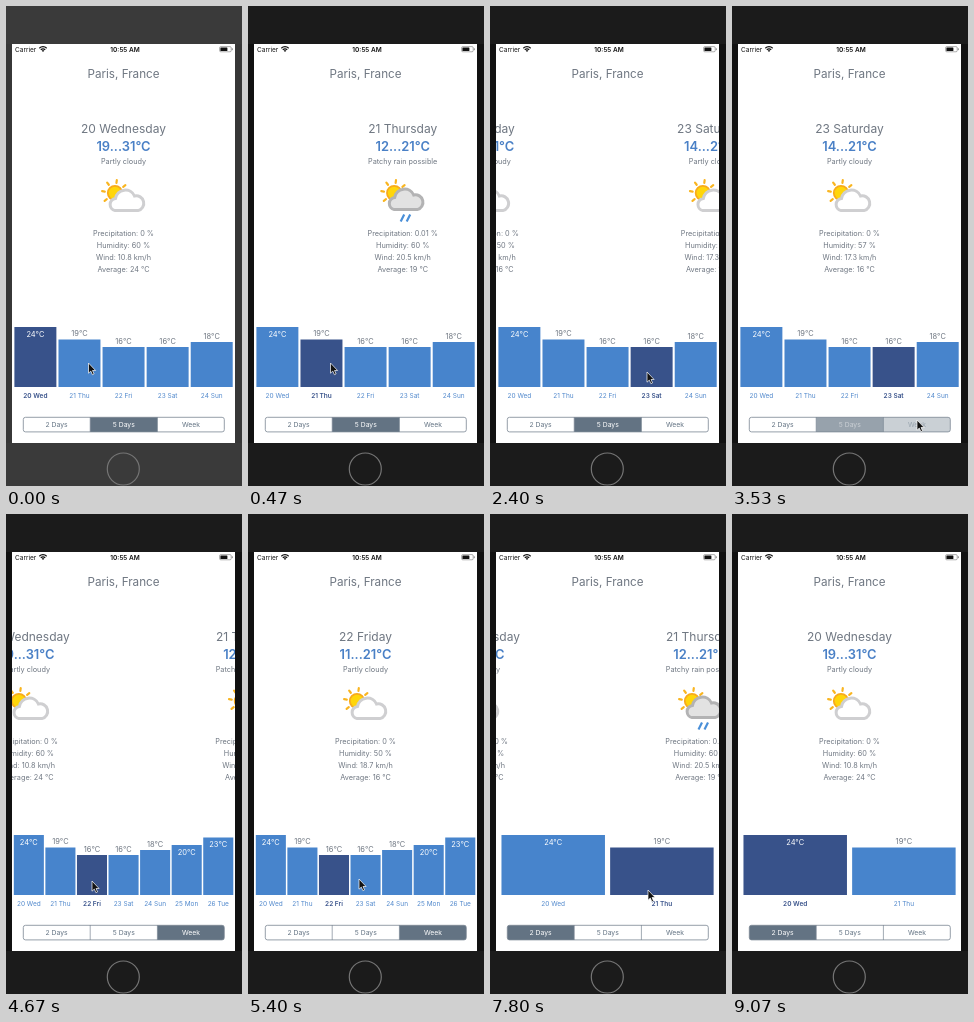
Animation of 236x480 px, one loop 9.99 s. Source, as an HTML page:

```html
<!DOCTYPE html>
<html lang="en">
<head>
<meta charset="utf-8">
<title>Weather</title>
<style>
  html, body { margin: 0; width: 100%; height: 100%; overflow: hidden; background: #1b1b1b; }
  svg { display: block; width: 236px; height: 480px; }
  text { font-family: Inter, "Liberation Sans", sans-serif; text-anchor: middle; fill: #6f7782; }
  .left { text-anchor: start; }
</style>
</head>
<body>
<svg id="stage" viewBox="0 0 236 480" xmlns="http://www.w3.org/2000/svg">
  <defs>
    <clipPath id="screen"><rect x="6" y="38" width="223" height="399"/></clipPath>
    <clipPath id="pill"><rect x="17.3" y="411.3" width="201" height="14.6" rx="2.2"/></clipPath>
  </defs>
  <rect id="body" width="236" height="480"/>
  <rect id="sides" y="38" width="236" height="399"/>
  <rect x="6" y="38" width="223" height="399" fill="#fff"/>
  <circle cx="117.3" cy="463" r="16" fill="none" stroke="#757575" stroke-width="1.2"/>

  <text class="left" x="9" y="45.6" font-size="6.5" style="fill:#111">Carrier</text>
  <g fill="none" stroke="#111" stroke-width="1.2">
    <path d="M33.3 42.2a5.3 5.3 0 0 1 7.4 0M34.8 43.8a3.1 3.1 0 0 1 4.4 0"/>
    <path d="M37 46l-1.2-1.3a1.7 1.7 0 0 1 2.4 0z" fill="#111" stroke="none"/>
  </g>
  <text x="119" y="45.6" font-size="6.5" font-weight="600" style="fill:#111">10:55 AM</text>
  <rect x="213.6" y="40.6" width="11.6" height="5.2" rx="1.2" fill="none" stroke="#777" stroke-width=".6"/>
  <rect x="214.4" y="41.4" width="7" height="3.6" rx=".5" fill="#111"/>
  <rect x="225.8" y="42.2" width=".9" height="2" rx=".4" fill="#777"/>

  <text x="117.5" y="71.8" font-size="11.7">Paris, France</text>
  <g clip-path="url(#screen)"><g id="pages"></g></g>
  <g id="charts"></g>
  <g id="tabs"></g>
  <path id="cursor" d="M0 0V10.2L2.3 8.1L3.9 11.7L5.6 10.9L4 7.5H7.1Z" fill="#111" stroke="#fff" stroke-width=".7"/>
</svg>
<script>
const LOOP = 9990, TICK = 1000 / 15, PAGE = 223, MID = 117.5, SLIDE = 306, FADE = 180;
const BLUE = '#4784cc', NAVY = '#38528a', SLATE = [99, 115, 131], WHITE = [255, 255, 255];

const days = [['20 Wed', 24], ['21 Thu', 19], ['22 Fri', 16], ['23 Sat', 16], ['24 Sun', 18], ['25 Mon', 20], ['26 Tue', 23]];
const forecasts = [
  ['20 Wednesday', '19...31', 'Partly cloudy', '0', 60, 10.8, 24],
  ['21 Thursday', '12...21', 'Patchy rain possible', '0.01', 60, 20.5, 19],
  ['22 Friday', '11...21', 'Partly cloudy', '0', 50, 18.7, 16],
  ['23 Saturday', '14...21', 'Partly cloudy', '0', 57, 17.3, 16]
];
const ranges = [2, 5, 7];

// start time, selected day
const picks = [[0, 0], [240, 1], [1265, 2], [2240, 3], [3595, 0], [4575, 2], [5510, 3], [6860, 0], [7630, 1], [8305, 0]];
// start of fade, selected tab
const taps = [[-1000, 1], [3500, 2], [6767, 0]];
const moves = [
  [0, 82.5, 357], [733, 82.5, 357], [1000, 112, 366], [1567, 112, 366], [1800, 157, 366],
  [2533, 157, 366], [2900, 184, 426], [3200, 184, 418], [3333, 185, 414], [3867, 185, 414],
  [4267, 86, 367], [5133, 86, 367], [5400, 111, 365], [5733, 111, 365], [6133, 68, 416],
  [6200, 68, 416], [6533, 68.5, 421], [7000, 68.5, 421], [7400, 158, 376], [7867, 158, 376],
  [8067, 104, 376], [LOOP, 104, 376]
];

const $ = id => document.getElementById(id);
const clamp = v => Math.min(1, Math.max(0, v));
const ease = u => u * u * (3 - 2 * u);
const lerp = (a, b, u) => a + (b - a) * u;
const mix = (a, b, u) => `rgb(${a.map((v, i) => Math.round(lerp(v, b[i], u)))})`;

function add(parent, tag, attrs = {}) {
  const el = document.createElementNS('http://www.w3.org/2000/svg', tag);
  for (const key in attrs) el.setAttribute(key, attrs[key]);
  return parent.appendChild(el);
}

function label(parent, str, x, y, size, color, weight = 400) {
  const el = add(parent, 'text', { x, y, 'font-size': size, 'font-weight': weight });
  if (color) el.style.fill = color;
  el.textContent = str;
  return el;
}

function drawIcon(g, rain) {
  for (let i = 0; i < 8; i++)
    add(g, 'path', { d: 'M0 -10.3V-13', stroke: '#f9b520', 'stroke-width': 2.2, 'stroke-linecap': 'round',
      transform: `translate(109 187) rotate(${i * 45 + 8})` });
  add(g, 'circle', { cx: 109, cy: 187, r: 7.2, fill: '#ffd60a', stroke: '#f8ab1c', 'stroke-width': 1.8 });
  add(g, 'path', {
    d: 'M109 204.6A6.2 6.2 0 0 1 109.5 192.4A10 10 0 0 1 128.5 190A7.5 7.5 0 1 1 132 204.6Z',
    fill: rain ? '#e2e2e2' : '#fff', stroke: rain ? '#b3b3b4' : '#cfcfd1', 'stroke-width': 3,
    transform: rain ? 'translate(0 -1)' : ''
  });
  if (rain) add(g, 'path', { d: 'M119 208.5L115.5 215.5M125 208.5L121.5 215.5', stroke: '#4a8fd8', 'stroke-width': 2.2 });
}

forecasts.forEach(([day, temp, sky, wet, humid, wind, avg], i) => {
  const g = add($('pages'), 'g', { transform: `translate(${i * PAGE} 0)` });
  label(g, day, MID, 126.7, 12);
  label(g, temp + '°C', MID, 145.2, 12.9, '#4a80c6', 600);
  label(g, sky, MID, 158.3, 7.3);
  drawIcon(g, i === 1);
  [`Precipitation: ${wet} %`, `Humidity: ${humid} %`, `Wind: ${wind} km/h`, `Average: ${avg} °C`]
    .forEach((line, row) => label(g, line, MID, 229.7 + row * 12, 7.3));
});

const charts = ranges.map(n => {
  const g = add($('charts'), 'g');
  const w = 222.5 / (n + 0.05 * (n + 1)), gap = w * 0.05;
  const bars = days.slice(0, n).map(([name, temp], i) => {
    const x = 6.3 + gap + i * (w + gap), h = temp * 2.5, top = 381 - h, inside = temp >= 20;
    const bar = add(g, 'rect', { x, y: top, width: w, height: h });
    label(g, temp + '°C', x + w / 2, top + (inside ? 9.8 : -3.4), 7.5, inside ? '#fff' : '');
    return { bar, name: label(g, name, x + w / 2, 391.6, 6.5) };
  });
  return { g, bars };
});

const tabs = ['2 Days', '5 Days', 'Week'].map((name, i) => {
  const fill = add($('tabs'), 'rect', { x: 17 + i * 67.2, y: 411, width: 67.2, height: 15.2,
    fill: mix(SLATE, SLATE, 0), 'clip-path': 'url(#pill)' });
  return { fill, text: label($('tabs'), name, 50.6 + i * 67.2, 421.1, 6.8) };
});
add($('tabs'), 'path', { d: 'M84.2 411V426M151.4 411V426', stroke: '#7b8794', 'stroke-width': .7 });
add($('tabs'), 'rect', { x: 17.3, y: 411.3, width: 201, height: 14.6, rx: 2.2, fill: 'none', stroke: '#7b8794', 'stroke-width': .8 });

const lastAt = (list, t) => list.findLastIndex(row => row[0] <= t);

function render(t) {
  const early = t < 130;
  $('body').setAttribute('fill', early ? '#3a3a3a' : '#1b1b1b');
  $('sides').setAttribute('fill', early ? '#373737' : '#111');

  const p = lastAt(picks, t), [start, day] = picks[p];
  const reset = p === 0 || p === 4 || p === 7;
  const page = reset ? day : lerp(picks[p - 1][1], day, ease(clamp((t - start) / SLIDE)));
  $('pages').setAttribute('transform', `translate(${-page * PAGE} 0)`);

  const shown = p < 4 ? 1 : p < 7 ? 2 : 0;
  charts.forEach(({ g, bars }, i) => {
    g.style.display = i === shown ? '' : 'none';
    bars.forEach(({ bar, name }, d) => {
      const on = d === day;
      bar.setAttribute('fill', on ? NAVY : BLUE);
      name.style.fill = on ? NAVY : '#5088cc';
      name.setAttribute('font-weight', on ? 600 : 400);
    });
  });

  const k = lastAt(taps, t), fade = 1 - (1 - clamp((t - taps[k][0]) / FADE)) ** 2;
  tabs.forEach(({ fill, text }, i) => {
    const on = i === taps[k][1] ? fade : k && i === taps[k - 1][1] ? 1 - fade : 0;
    fill.setAttribute('fill-opacity', on);
    text.style.fill = mix(SLATE, WHITE, on);
  });

  const m = Math.min(lastAt(moves, t), moves.length - 2), [t0, x0, y0] = moves[m], [t1, x1, y1] = moves[m + 1];
  const u = ease(clamp((t - t0) / (t1 - t0)));
  $('cursor').setAttribute('transform', `translate(${lerp(x0, x1, u)} ${lerp(y0, y1, u)})`);
  $('cursor').style.display = t > 9060 ? 'none' : '';
}

function frame() {
  render(Math.floor(((performance.now() % LOOP) + 4) / TICK) * TICK);
  requestAnimationFrame(frame);
}
frame();
</script>
</body>
</html>
```
